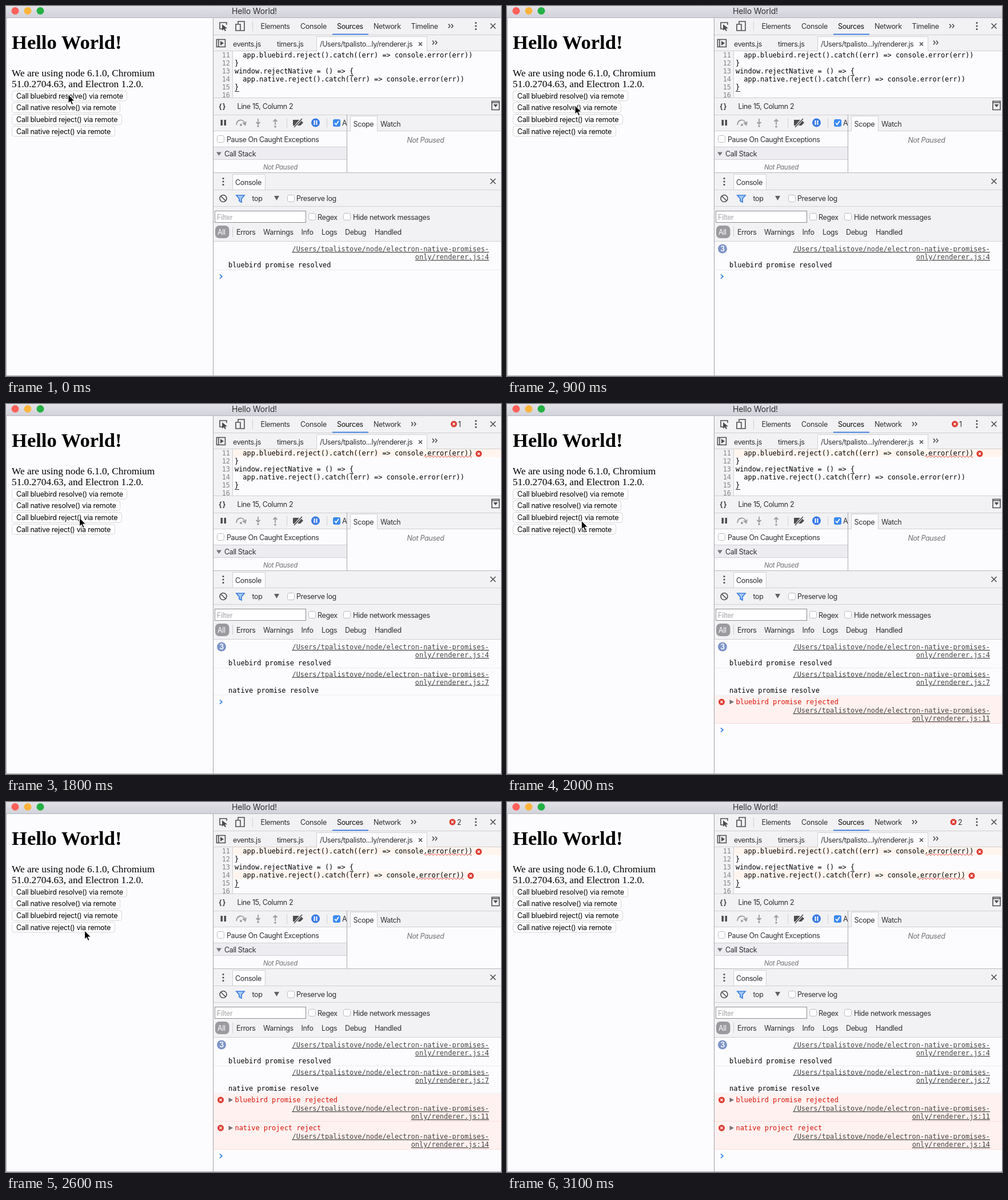
An HTML page for the animation above (3200 ms loop, 866 px wide and 647 px high).

```html
<!DOCTYPE html>
<html lang="en">
<head>
<meta charset="utf-8">
<title>Hello World!</title>
<style>
  html, body { margin: 0; width: 100%; height: 100%; overflow: hidden; background: #fcfcfe; }
  svg { display: block; }
  text { font: 12.5px Inter, Roboto, sans-serif; letter-spacing: -.03em; fill: #303033; }
  text.title { font-size: 14px; letter-spacing: -.01em; }
  text.page { font: 17.3px "Liberation Serif", serif; letter-spacing: 0; fill: #000; }
  text.heading { font: bold 34.6px "Liberation Serif", serif; letter-spacing: 0; fill: #000; }
  text.code { font: 11.93px "DejaVu Sans Mono", monospace; letter-spacing: 0; fill: #000; }
  text.link { text-anchor: end; text-decoration: underline; fill: #444; }
  text.number { text-anchor: end; fill: #858588; }
  text.error { fill: #d81508; }
  text.idle { font-style: italic; text-anchor: middle; fill: #707074; }
  text.button { letter-spacing: -.02em; fill: #000; }
  .bar { fill: #f2f2f5; }
  .rule { stroke: #d0d0d2; fill: none; }
  .icon { stroke: #4d4d50; fill: none; stroke-width: 1.6; }
  .solid { fill: #4d4d50; }
  .box { fill: #fff; stroke: #bcbcc0; }
  .tab { fill: #fcfcfe; stroke: #d0d0d2; }
  .wave { stroke: #e33a2c; fill: none; }
</style>
</head>
<body>
<svg width="866" height="647" viewBox="0 0 866 647">
  <defs>
    <linearGradient id="chrome" x2="0" y2="1">
      <stop stop-color="#e2e2e8"/><stop offset="1" stop-color="#d2d2da"/>
    </linearGradient>
    <clipPath id="editor"><path d="M363 79H866V160H363Z"/></clipPath>
    <clipPath id="debugger"><path d="M363 190H596V291H363Z"/></clipPath>
    <g id="cross"><circle r="5.5" fill="#dc3a30"/><path d="M-2-2 2 2M2-2-2 2" stroke="#fff" stroke-width="1.4"/></g>
    <path id="more" class="icon" d="M-4-3.5-1 0-4 3.5M1-3.5 4 0 1 3.5"/>
    <g id="dots" class="solid"><circle cy="-5.5" r="1.6"/><circle r="1.6"/><circle cy="5.5" r="1.6"/></g>
    <path id="close" class="icon" d="M-4.5-4.5 4.5 4.5M4.5-4.5-4.5 4.5"/>
  </defs>
  <rect width="866" height="647" fill="#fcfcfe"/>

  <!-- window frame and page -->
  <rect width="866" height="20" fill="url(#chrome)"/>
  <path d="M0 20.5H866" stroke="#b5b5bc"/>
  <circle cx="16" cy="8.5" r="6.5" fill="#fc605a"/>
  <circle cx="38" cy="8.5" r="6.5" fill="#fcb43c"/>
  <circle cx="60" cy="8.5" r="6.5" fill="#24b144"/>
  <text class="title" x="395" y="14">Hello World!</text>
  <text class="heading" x="10" y="75">Hello World!</text>
  <text class="page" x="10" y="123">We are using node 6.1.0, Chromium</text>
  <text class="page" x="10" y="142">51.0.2704.63, and Electron 1.2.0.</text>
  <g id="buttons"></g>

  <!-- main toolbar -->
  <rect class="bar" x="363" y="21" width="503" height="58"/>
  <path class="rule" d="M363 50.5H866M431.5 27V44"/>
  <path class="icon" d="M378 40H374V29H386V33"/>
  <path class="solid" d="M378 32V43L381 40.5 383 44 385 43 383 39.5 387 39Z"/>
  <path class="icon" d="M406 31V27H417V43H411M402 32H410V43H402Z"/>
  <text x="445.5" y="40">Elements</text>
  <text x="515" y="40">Console</text>
  <text x="579" y="40" style="fill:#111">Sources</text>
  <text x="643" y="40">Network</text>
  <path d="M571 49.5H634" stroke="#4a86e4" stroke-width="2"/>
  <g id="clean">
    <text x="708.5" y="40">Timeline</text>
    <use href="#more" x="778" y="35"/>
  </g>
  <g id="failed">
    <use href="#more" x="713" y="35"/>
    <use id="countIcon" href="#cross" y="35"/>
    <text id="count" y="40"></text>
  </g>
  <use href="#dots" x="822" y="35"/>
  <use href="#close" x="852" y="35"/>

  <!-- file tabs -->
  <path class="icon" d="M368.5 58.5H383.5V71.5H368.5ZM372 59V71"/>
  <path class="solid" d="M375 61 381 65 375 69Z"/>
  <text x="397" y="70.5">events.js</text>
  <text x="474" y="70.5">timers.js</text>
  <path class="rule" d="M363 78.5H866"/>
  <path class="tab" d="M543.5 79V53.5H736.5V79"/>
  <text x="549" y="70.5">/Users/tpalisto...ly/renderer.js</text>
  <path class="icon" d="M722 63.5 728 69.5M728 63.5 722 69.5"/>
  <use href="#more" x="750" y="64"/>

  <!-- editor -->
  <g clip-path="url(#editor)">
    <rect class="bar" x="363" y="79" width="33" height="82"/>
    <path class="rule" d="M396.5 79V160"/>
    <g id="marks"></g>
    <g id="source"></g>
    <path d="M601 121.5H608M400 149.5H408" stroke="#222"/>
  </g>
  <rect class="bar" x="363" y="160" width="503" height="59"/>
  <path class="rule" d="M363 160.5H866M363 190.5H866"/>
  <text x="372" y="179.5" style="font-weight:600;letter-spacing:1px">{}</text>
  <text x="404.5" y="180">Line 15, Column 2</text>
  <path class="icon" d="M850 166.5H863V181.5H850ZM850 169H863"/>
  <path class="solid" d="M852.5 172H860.5L856.5 177Z"/>

  <!-- debugger -->
  <g clip-path="url(#debugger)">
    <path class="solid" d="M375.5 199H379V209H375.5ZM381.5 199H385V209H381.5Z"/>
    <g fill="none" stroke="#9b9b9f" stroke-width="1.8">
      <path d="M403 208C404 197 416 197 418 206M414 204 418.5 208 420 202"/>
      <path d="M441 197V206M437.5 203 441 206.5 444.5 203M471 208V199M467.5 202 471 198.5 474.5 202"/>
    </g>
    <g fill="#9b9b9f"><circle cx="411" cy="208" r="2"/><circle cx="441" cy="210" r="1.8"/><circle cx="471" cy="211" r="1.8"/></g>
    <path class="rule" d="M491.5 196V213M561.5 196V213"/>
    <path class="solid" d="M502 199H515L520 204 515 209H502Z"/>
    <path d="M504 213 518 196" stroke="#f2f2f5" stroke-width="4"/>
    <path class="icon" d="M504 212 518 197"/>
    <circle cx="541.5" cy="204" r="7.5" fill="#3879e5"/>
    <path d="M539.5 200V208M543.5 200V208" stroke="#fff" stroke-width="2"/>
    <rect x="572" y="198" width="13" height="13" rx="3" fill="#3b8af0"/>
    <path d="M575 204.5 577.5 207.5 582 201" fill="none" stroke="#fff" stroke-width="1.8"/>
    <text x="588" y="209">A</text>
    <rect x="363" y="219" width="233" height="72" fill="#fcfcfe"/>
    <rect x="363" y="247" width="233" height="21" fill="#ededf1"/>
    <path class="rule" d="M363 218.5H596M363 246.5H596M363 268.5H596"/>
    <rect class="box" x="369.5" y="226.5" width="12" height="12" rx="3"/>
    <text x="386" y="238">Pause On Caught Exceptions</text>
    <path d="M368 255.5H377L372.5 262Z" fill="#77777a"/>
    <text x="382" y="262.5">Call Stack</text>
    <text class="idle" x="480" y="285.5" style="font-size:11.5px">Not Paused</text>
  </g>
  <path class="rule" d="M597 218.5H866"/>
  <path class="tab" d="M602.5 219V192.5H649.5V219"/>
  <text x="607.5" y="210.5">Scope</text>
  <text x="655" y="210.5">Watch</text>
  <text class="idle" x="734" y="238.5">Not Paused</text>
  <path d="M596.5 190V291" stroke="#aaaab0"/>

  <!-- console toolbars -->
  <rect class="bar" x="363" y="292" width="503" height="119"/>
  <path class="rule" d="M363 321.5H866M363 350.5H866M363 411.5H866"/>
  <path d="M363 291.5H866" stroke="#b8b8bd"/>
  <use href="#dots" x="380" y="307"/>
  <path class="tab" d="M396.5 321V294.5H453.5V321"/>
  <text x="401" y="312.5">Console</text>
  <use href="#close" x="852" y="306.5"/>
  <circle class="icon" cx="380" cy="336.5" r="6"/>
  <path class="icon" d="M376 332.5 384 340.5"/>
  <path d="M403 331H417L412 337V343L408 341V337Z" fill="#a9cbf5" stroke="#3b7fe0" stroke-width="1.7"/>
  <text x="430.5" y="341">top</text>
  <path d="M469 332H478L473.5 340Z" fill="#606064"/>
  <rect class="box" x="492.5" y="330.5" width="12" height="12" rx="3"/>
  <text x="508" y="341">Preserve log</text>
  <rect x="365.5" y="358.5" width="159" height="20" fill="#fff" stroke="#8d8d92"/>
  <text x="369" y="373.5" style="fill:#a5a5a9">Filter</text>
  <rect class="box" x="529.5" y="362.5" width="12" height="12" rx="3"/>
  <text x="545" y="373.5">Regex</text>
  <rect class="box" x="590.5" y="362.5" width="12" height="12" rx="3"/>
  <text x="607" y="373.5">Hide network messages</text>
  <rect x="366" y="384" width="24.5" height="22" rx="7" fill="#9b9b9f"/>
  <text x="370" y="399.5" style="fill:#fff">All</text>
  <path class="rule" d="M396.5 386V404"/>
  <text x="403" y="399.5">Errors</text>
  <text x="450" y="399.5">Warnings</text>
  <text x="516.5" y="399.5">Info</text>
  <text x="552" y="399.5">Logs</text>
  <text x="593" y="399.5">Debug</text>
  <text x="645" y="399.5">Handled</text>

  <!-- console -->
  <g id="log"></g>
  <g id="badge">
    <circle cx="377" cy="424.5" r="8" fill="#7d94c8"/>
    <text id="repeat" x="377" y="429" text-anchor="middle" style="fill:#fff;font-weight:600"></text>
  </g>
  <path id="prompt" d="M374-3.5 378 0 374 3.5" fill="none" stroke="#3d86ea" stroke-width="1.7"/>

  <path d="M362.5 21V647" stroke="#a2a2a8"/>
  <path d="M.5 21V647M0 646.5H866" stroke="#a8a8ae"/>
  <path id="pointer" d="M0 0V15L3.5 11.8 6 17.5 8.5 16.5 6 11H11Z" fill="#000" stroke="#fff"/>
</svg>
<script>
const LOOP = 3200, STEP = 100, CHAR = 7.18;
const $ = id => document.getElementById(id);
const show = (el, on) => { el.style.display = on ? '' : 'none'; };
const text = (x, y, value, cls) => `<text x="${x}" y="${y}" class="${cls}">${value}</text>`;

// Page buttons: label and width
$('buttons').innerHTML = [
  ['bluebird resolve', 202], ['native resolve', 190], ['bluebird reject', 193], ['native reject', 181]
].map(([label, width], i) => {
  const y = 148.5 + i * 20.6;
  return `<rect x="10.5" y="${y}" width="${width - 1}" height="17.5" rx="4" fill="#fff" stroke="#d6d6da"/>` +
    text(18, y + 13.3, `Call ${label}() via remote`, 'button');
}).join('');

// Editor lines: indent and code
$('source').innerHTML = [
  [2, 'app.bluebird.reject().catch((err) =&gt; console.error(err))'],
  [0, '}'],
  [0, 'window.rejectNative = () =&gt; {'],
  [2, 'app.native.reject().catch((err) =&gt; console.error(err))'],
  [0, '}'],
  [0, '']
].map(([indent, code], i) => {
  const y = 90 + i * 14;
  return text(392, y, 11 + i, 'code number') + text(400 + indent * CHAR, y, code, 'code');
}).join('');

// Wavy underline below ".error(err))" with an icon after it
const marker = (end, y) =>
  `<g><rect x="397" y="${y - 7}" width="469" height="14" fill="#fff5ee"/>` +
  `<path class="wave" d="M${end - 86} ${y + 6}${'q1.5-3 3 0t3 0'.repeat(14)}"/>` +
  `<use href="#cross" x="${end + 10}" y="${y + 1}"/></g>`;
$('marks').innerHTML = marker(817, 86) + marker(803, 128);

// Console rows
const link = (y, line) =>
  text(845, y, '/Users/tpalistove/node/electron-native-promises-', 'code link') +
  text(845, y + 14, `only/renderer.js:${line}`, 'code link');
const logRow = (top, message, line) =>
  `<g>${link(top + 17, line)}${text(389, top + 45, message, 'code')}` +
  `<path d="M363 ${top + 49.5}H866" stroke="#ececf0"/></g>`;
const errorRow = (top, message, line) =>
  `<g><rect x="363" y="${top}" width="503" height="48" fill="#fff1ef"/>` +
  `<path d="M363 ${top + 48.5}H866" stroke="#fbdedc"/>` +
  `<use href="#cross" x="375.5" y="${top + 11}"/>` +
  `<path d="M389.5 ${top + 7}V${top + 15}L397 ${top + 11}Z" fill="#747478"/>` +
  `${text(400.5, top + 15, message, 'code error')}${link(top + 30, line)}</g>`;
$('log').innerHTML =
  logRow(412, 'bluebird promise resolved', 4) +
  logRow(459.5, 'native promise resolve', 7) +
  errorRow(510, 'bluebird promise rejected', 11) +
  errorRow(559, 'native project reject', 14);

const rows = [...$('log').children], marks = [...$('marks').children];
const rowTimes = [0, 1200, 1900, 2500];
const repeatTimes = [0, 200, 500];
const errorTimes = [1800, 2400];
const promptY = [473, 521, 570, 619];
const pointerEnd = 2900;

// Pointer stops: time, x, y
const path = [
  [0, 109, 155], [600, 109, 155], [800, 119, 174], [1400, 119, 174], [1700, 128.5, 199],
  [1900, 128.5, 199], [2200, 135.5, 219], [2400, 135.5, 219], [2600, 137.5, 225], [LOOP, 137.5, 225]
];

function pointerAt(t) {
  const i = path.findIndex(p => p[0] > t);
  const [t0, x0, y0] = path[i - 1], [t1, x1, y1] = path[i];
  const u = (t - t0) / (t1 - t0), ease = u * u * (3 - 2 * u);
  return [x0 + (x1 - x0) * ease, y0 + (y1 - y0) * ease];
}

function draw(now) {
  const t = Math.floor(now % LOOP / STEP) * STEP;
  const passed = times => times.filter(time => t >= time).length;
  const errors = passed(errorTimes), shown = passed(rowTimes), repeats = passed(repeatTimes);

  rows.forEach((row, i) => show(row, i < shown));
  marks.forEach((mark, i) => show(mark, i < errors));
  show($('clean'), !errors);
  show($('failed'), errors);
  $('count').textContent = errors;
  $('count').setAttribute('x', errors > 1 ? 789 : 791);
  $('countIcon').setAttribute('x', errors > 1 ? 781 : 783.5);
  show($('badge'), repeats > 1);
  $('repeat').textContent = repeats;
  $('prompt').setAttribute('transform', `translate(0 ${promptY[shown - 1]})`);
  show($('pointer'), t < pointerEnd);
  $('pointer').setAttribute('transform', `translate(${pointerAt(t)})`);
}

const start = performance.now();
(function tick() {
  draw(performance.now() - start);
  requestAnimationFrame(tick);
})();
</script>
</body>
</html>
```
